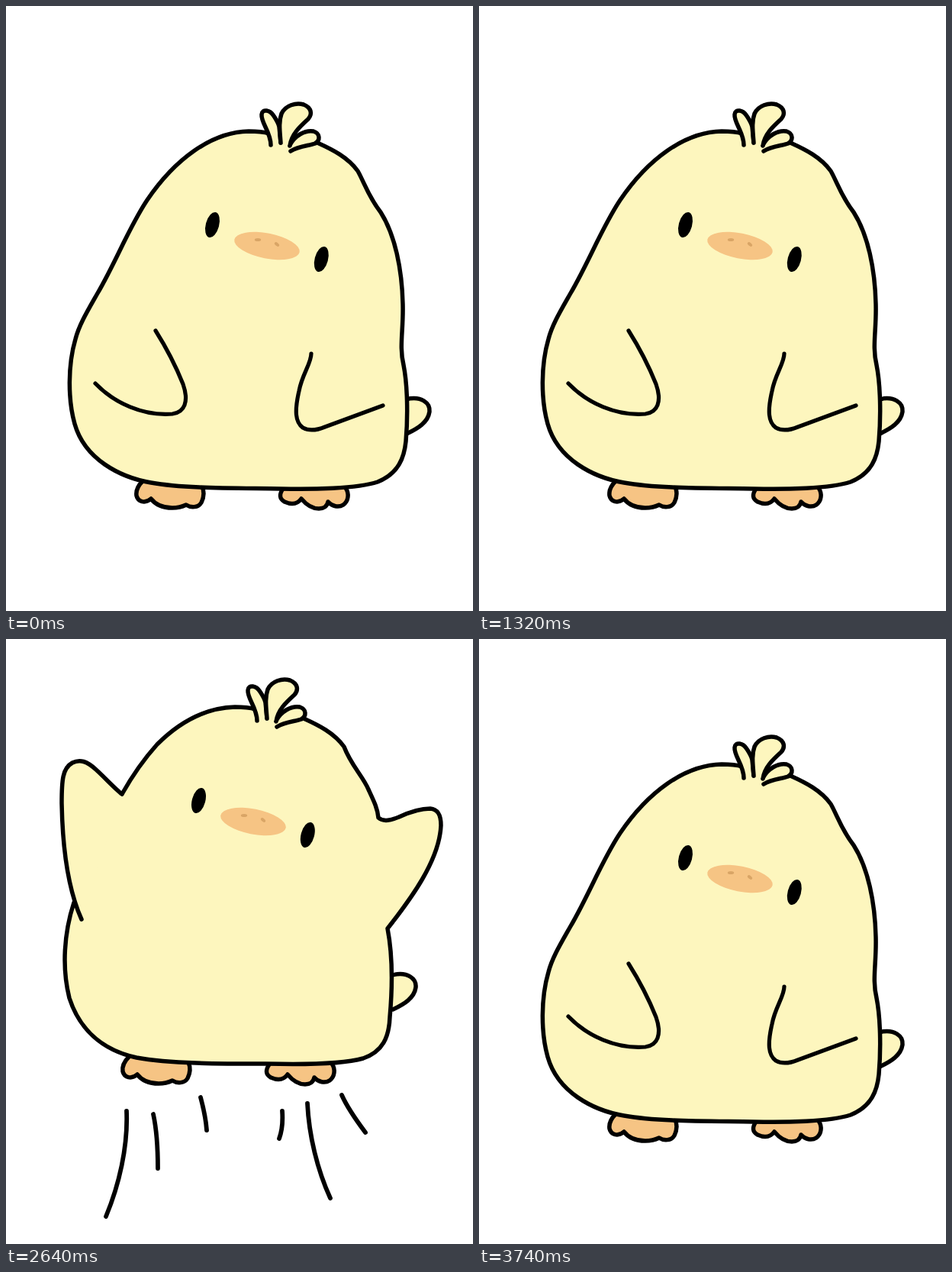
Animation of 612x792 px, one loop 4180 ms. Source, as an HTML page:

```html
<!DOCTYPE html>
<html lang="en">
<head>
<meta charset="utf-8">
<title>Hopping chick</title>
<style>
html, body { margin: 0; width: 100%; height: 100%; overflow: hidden; background: #fff; }
svg { display: block; width: 100%; height: 100%; }
.line { fill: none; stroke: #000; stroke-width: 5.5; stroke-linecap: round; stroke-linejoin: round; }
.skin { fill: #fdf6be; }
.foot { fill: #f6c484; }
.beak { fill: #f6c484; }
.nostril { fill: #d9a566; }
#arms { stroke-width: 5.2; }
#speed { stroke-width: 5.8; }
</style>
</head>
<body>
<svg viewBox="0 0 612 792">
  <path id="tail" class="line skin" d="M524 515C545 510 556 520 555 531C553 545 540 553 525 560"/>
  <path id="footL" class="line foot" d="M179 622C173 628 170 634 171 641C173 649 182 652 190 645C196 653 206 657 218 657C226 657 232 655 236 653C242 657 252 657 256 650C259 644 260 636 257 629"/>
  <path id="footR" class="line foot" d="M363 632C358 639 358 645 365 649C374 653 382 652 387 645C392 651 399 658 410 658C416 658 421 655 422 649C427 655 436 657 442 653C449 648 450 638 445 631"/>
  <path id="body" class="line skin"/>
  <path id="wing" class="line skin"/>
  <path id="arms" class="line"/>
  <path id="speed" class="line" d="M158 618C160 665 148 715 131 756M193 622C198 645 199 668 199 693M255 600C259 615 262 628 263 643M362 618C363 632 362 643 358 654M395 608C397 650 408 695 425 732M440 597C448 615 459 630 471 646"/>
  <g id="head">
    <path class="line skin" d="M347 182C347 165 334 153 335 142C336 134 346 136 351 144C355 150 357 154 358 158L360 179"/>
    <path class="line skin" d="M372 182C378 170 392 162 403 164C412 167 412 176 405 180C397 183 384 183 373 190"/>
    <path class="line skin" d="M360 179C359 165 357 152 361 141C366 130 380 126 390 129C400 133 402 141 396 148C385 158 374 168 372 183"/>
    <ellipse class="beak" rx="43.5" ry="16.5" transform="translate(342 314) rotate(11)"/>
    <ellipse class="nostril" cx="330" cy="306" rx="4.2" ry="2.1"/>
    <ellipse class="nostril" rx="3.6" ry="2.1" transform="translate(355 312) rotate(40)"/>
    <g id="open">
      <ellipse rx="8.7" ry="17" transform="translate(270.5 286.5) rotate(15)"/>
      <ellipse rx="8.7" ry="17" transform="translate(413.3 331.5) rotate(15)"/>
    </g>
    <g id="shut">
      <path class="line" d="M-21 -3Q0 11 21 -3" transform="translate(270.5 286.5) rotate(15)"/>
      <path class="line" d="M-21 -3Q0 11 21 -3" transform="translate(416 331.5) rotate(15)"/>
    </g>
  </g>
</svg>
<script>
const el = id => document.getElementById(id);

// Shared outline pieces
const crown = 'c7 0 17 0 27 3l15 3 12 2 8 5 28 2c20 9 40 19 53 37';
const base = 'C522 590 515 612 487 623C460 632 400 633 360 632C300 631 235 632 190 624';
const restSide = 'C470 232 474 248 491 270C510 300 519 345 520 390C521 425 515 445 521 470C526 495 527 535 524 570';
const waveSide = 'C470 230 478 250 489 269C510 300 519 345 520 390C519 420 516 445 519 460C526 490 528 535 524 570';
const waveBelly = crown + waveSide + base + 'C140 612 107 580 105 528C105 500 111 470 123 441';
const armL = 'M196 425C208 444 222 470 232 495C240 518 234 532 218 534C180 537 142 520 117 494';
const armR = 'M400 455C400 468 388 482 384 504C378 530 379 545 389 552C396 556 406 556 418 551L494 523';
const waveWing = 'M184 288C177 281 172 270 162 256C152 242 143 236 133 237C112 240 98 260 95 285C91 320 92 360 103 394C111 417 124 441 138 458';

const rest = {
  body: 'M318 164' + crown + restSide + base +
    'C149 617 103 593 90 547C81 515 81 470 91 436C96 417 107 399 120 376C144 335 161 290 185 254C221 201 269 165 318 164Z',
  wing: '', arms: armL + armR, tilt: 0,
  head: [0, 0], tail: [0, 0], footL: [0, 0], footR: [0, 0]
};
const blink = { ...rest, shut: true };
const wave = {
  ...rest, wing: waveWing, arms: armR,
  body: 'M179 281C183 262 193 242 212 220C245 187 285 165 318 164' + waveBelly
};
const waveOut = {
  ...wave, tilt: -7,
  body: 'M162 284C172 262 186 243 206 222C240 187 285 165 318 164' + waveBelly
};
const crouch = {
  ...rest,
  body: 'M318 216' + crown +
    'C470 284 474 295 488 315C513 352 514 410 525 458C532 495 545 515 550 540C554 570 548 580 541 602' +
    'C533 627 520 637 495 637C450 638 400 629 340 630C310 630 285 632 250 631C220 628 150 612 105 589' +
    'C75 574 62 548 64 515C68 455 108 420 138 378C160 348 175 318 196 288C230 242 270 217 318 216Z',
  arms: 'M225 422C230 430 234 437 239 437C246 436 258 424 274 416C292 408 305 419 304 435' +
    'C302 450 296 468 283 487C268 509 248 519 222 519C196 518 170 504 150 485' +
    'M450 470C436 458 424 446 409 440C392 433 381 439 381 455C381 485 390 514 404 530' +
    'C418 543 434 545 452 542C478 536 503 516 504 494C504 472 490 455 475 434',
  head: [0, 52], tail: [22, 22], footL: [-5.5, 2], footR: [15.5, 3]
};
const lift = [-18, -75];
const jump = {
  ...rest,
  body: 'M152 203C165 180 180 158 198 138C230 106 265 90 300 89' + crown +
    'C452 165 468 180 475 197C482 212 487 222 488 234C495 240 505 237 515 233C530 226 545 222 556 222' +
    'C566 223 570 230 570 244C568 290 530 341 500 379C506 410 507 450 503 495C502 521 494 540 468 549' +
    'C440 557 380 557 340 556C280 556 215 556 171 548C125 538 96 510 83 470C73 430 76 385 89 345',
  wing: 'M152 203C145 198 130 182 118 171C106 160 97 157 87 162C74 169 73 185 73 215C74 270 80 325 99 367',
  arms: '', speed: true,
  head: lift, tail: lift, footL: lift, footR: lift
};

const steps = [
  [220, rest], [220, blink], [220, rest],
  [220, wave], [220, waveOut], [220, wave],
  [440, rest], [220, blink], [440, rest],
  [220, crouch], [220, jump], [220, crouch],
  [440, rest], [220, blink], [440, rest]
];
const loop = steps.reduce((sum, [ms]) => sum + ms, 0);

function poseAt(time) {
  let t = time % loop;
  for (const [ms, pose] of steps) {
    if (t < ms) return pose;
    t -= ms;
  }
  return rest;
}

const show = (id, on) => el(id).setAttribute('visibility', on ? 'visible' : 'hidden');

function draw(pose) {
  for (const id of ['body', 'wing', 'arms']) el(id).setAttribute('d', pose[id]);
  for (const id of ['head', 'tail', 'footL', 'footR']) {
    el(id).setAttribute('transform', `translate(${pose[id]})`);
  }
  el('wing').setAttribute('transform', `rotate(${pose.tilt} 138 458)`);
  show('open', !pose.shut);
  show('shut', pose.shut);
  show('speed', pose.speed);
}

const start = performance.now();
let current;
function tick() {
  const pose = poseAt(performance.now() - start);
  if (pose !== current) draw(current = pose);
  requestAnimationFrame(tick);
}
tick();
</script>
</body>
</html>
```
